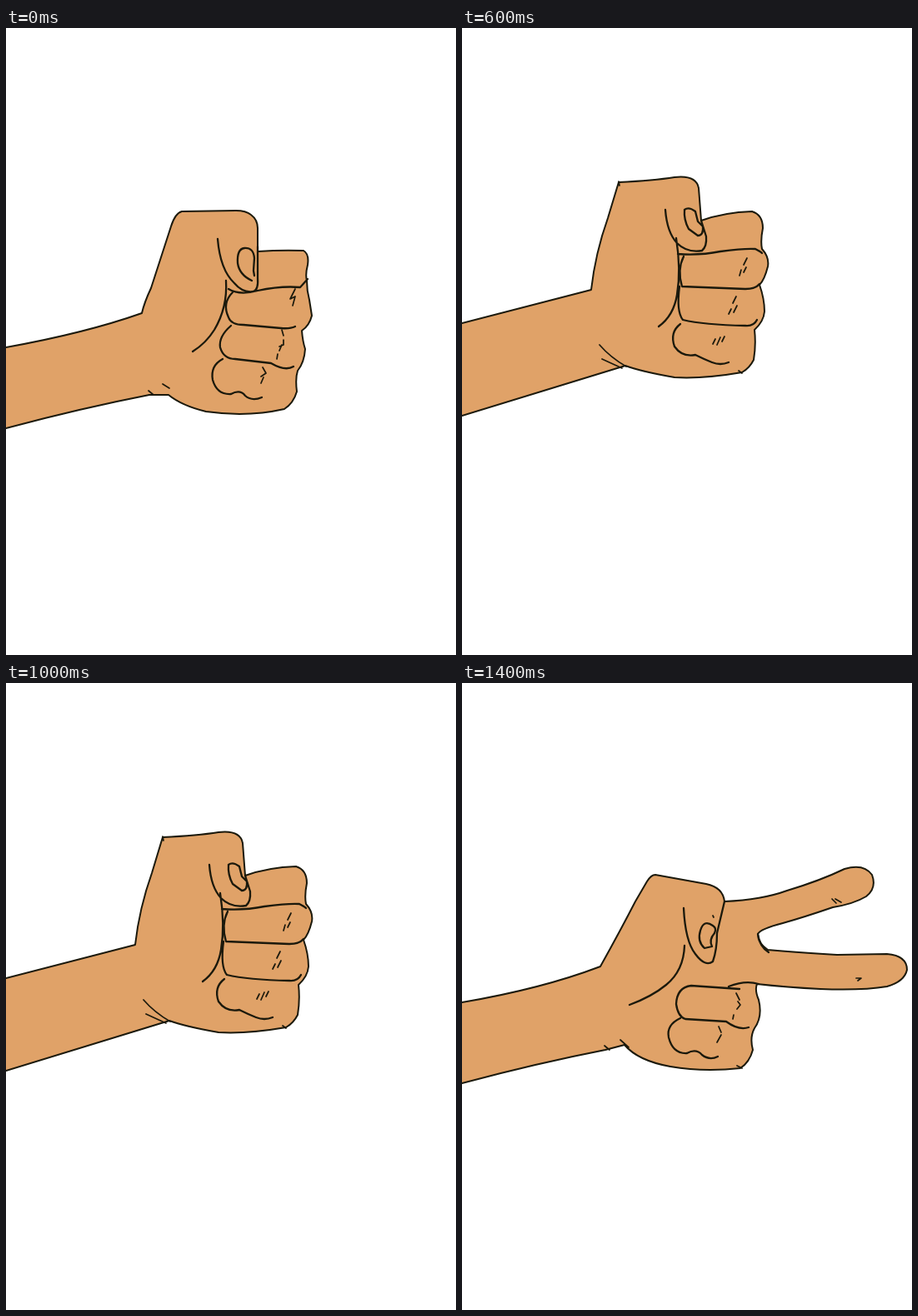
These frames come from a looping animation (540 by 752 pixels, 3.4 s). An HTML page with a canvas:

```html
<!DOCTYPE html>
<html lang="en">
<head>
<meta charset="utf-8">
<title>Rock paper scissors</title>
<style>
  html, body { margin: 0; width: 100%; height: 100%; overflow: hidden; background: #fff; }
  canvas { display: block; width: 540px; height: 752px; }
</style>
</head>
<body>
<canvas id="stage" width="540" height="752"></canvas>
<script>
const ctx = document.getElementById('stage').getContext('2d');
const SKIN = '#e0a268', INK = '#1b190c';
const STEP = 100, LOOP = 3400;

const pose = (outline, creases = '', marks = '', tilt = 0) => ({
  outline: new Path2D(outline),
  creases: new Path2D(creases),
  marks: new Path2D(marks),
  tilt
});

const low = pose(
  `M-40 391 L0 383 Q95 366 163 342 Q166 329 174 312 L198 238 Q203 222 211 220
   L276 219 Q288 219 294 224 Q302 230 302 240 L302 268 Q330 266 357 267
   Q364 271 362 284 Q359 296 361 303 Q361 315 364 326 L367 345 Q364 357 355 363
   Q356 376 359 385 Q358 401 350 411 Q347 420 349 436 Q345 450 334 457
   Q290 467 240 460 Q211 453 195 440 L172 440 Q90 456 0 480 L-40 490 Z`,
  `M254 253 Q257 290 274 306 Q284 318 297 316 Q303 314 302 300 L302 262
   M295 303 Q280 296 278 282 Q277 265 286 264 Q297 263 298 276 L297 291 L298 297
   M264 303 Q266 335 250 362 Q240 378 224 388
   M267 313 Q280 321 302 315 Q330 309 353 311 L362 301
   M272 317 Q259 330 267 347 Q270 356 285 356 L330 360 Q341 361 347 358
   M270 357 Q255 370 257 383 Q261 397 275 397 L318 402 Q335 412 345 406
   M260 397 Q245 405 248 422 Q253 440 270 439 Q281 433 287 441 Q295 448 307 443`,
  `M171 435 L177 440 M188 427 L196 432 M347 313 L341 325 L347 322 L344 333
   M331 362 L333 369 M333 374 L333 380 L328 382 M331 380 L328 387 M326 391 L325 397
   M308 407 L312 414 L306 418 M309 419 L306 426`);

const mid = pose(
  `M-40 365 L0 354 L155 314 Q160 270 175 228 L188 185 Q230 183 255 179
   Q281 176 284 192 L287 231 Q315 221 348 220 Q361 224 361 240 Q358 255 360 265
   Q369 275 367 286 Q363 302 357 308 Q363 325 363 340 Q362 352 351 362
   Q353 380 350 398 Q345 408 336 413 Q290 421 255 419 Q215 412 196 405
   L0 465 L-40 477 Z`,
  `M244 218 Q246 245 258 258 Q270 270 288 267 Q294 262 293 250 L287 231
   M267 218 Q272 214 280 220 L283 232 L289 238 Q290 249 283 249 L272 241 Q266 230 267 218
   M257 252 Q263 290 258 320 Q254 345 236 358
   M259 271 Q285 273 310 268 Q340 264 352 265 Q358 268 360 270
   M266 274 Q258 290 264 310 L340 313 Q352 313 357 307
   M261 310 Q257 340 265 350 Q290 356 340 357 Q350 358 354 350
   M262 355 Q249 365 255 382 Q264 395 280 392 Q290 397 300 401 Q310 405 320 401`,
  `M165 380 Q178 395 197 406 M168 397 L192 408 M188 184 L189 189 M332 411 L336 414
   M342 276 L338 284 M341 287 L338 293 M335 290 L333 297
   M329 322 L325 330 M330 333 L326 341 M323 337 L320 343
   M304 373 L301 379 M310 371 L306 380 M315 370 L312 376`);

const highShape = [
  `M-40 331 L0 310 L144 235 Q141 195 148 125 Q152 106 168 104 Q200 102 225 94
   Q238 90 241 95 L263 134 Q290 121 314 111 Q322 112 326 124 L338 150
   Q342 163 337 172 Q339 185 344 205 Q343 218 335 227 Q341 243 341 255
   Q338 270 331 274 L335 303 Q328 316 318 321 Q290 328 250 329 Q210 328 183 325
   L0 414 L-40 433 Z`,
  `M262 132 Q273 150 273 165 Q268 175 252 174 Q238 172 226 163 Q217 158 214 149
   M190 140 Q200 157 217 160 L228 162
   M263 151 Q245 154 237 142 Q230 130 239 125 Q249 122 255 132 Q261 145 257 149
   M238 170 L243 178 Q285 170 317 159 M325 160 Q331 170 335 181 L339 190
   M241 178 Q246 215 232 254
   M244 180 Q238 200 250 209 L272 211 Q300 212 323 207 L334 228
   M246 211 Q239 235 244 246 Q252 253 270 251 L320 250 L332 277
   M250 254 Q237 264 240 282 Q247 292 262 290 Q275 286 284 292 L312 295
   M277 288 L293 304`,
  `M160 301 L170 312 M165 295 L175 307 M167 321 L187 326
   M315 126 L317 133 M319 123 L320 130 M312 173 L307 183 L313 182 L309 189
   M307 185 L303 197
   M300 224 L295 236 L302 234 L299 243 M288 258 L279 270 L288 267 L279 283`
];
const high = pose(...highShape);
const peak = pose(...highShape, -0.044);

const swing = pose(
  `M-40 338 L0 322 Q70 293 130 259 Q146 249 149 260 L157 276 Q156 240 153 205
   Q145 165 146 140 Q148 119 160 116 Q180 107 200 103 Q212 99 219 108
   Q240 135 266 171 Q264 155 255 137 Q275 120 303 112 Q308 114 308 122
   L311 130 L308 128 Q325 200 331 250 Q336 300 337 350 L339 410 L334 445
   Q331 462 323 462 Q280 458 230 444 L183 429 L0 470 L-40 479 Z`);

const scissors = pose(
  `M-40 391 L0 383 Q95 367 166 340 Q190 297 208 262 L222 238 Q227 230 232 230
   L293 241 Q313 245 315 262 Q360 260 390 249 Q430 237 459 223 Q482 216 492 230
   Q498 246 485 256 Q470 265 445 269 Q410 281 385 288 Q358 295 355 301
   Q355 312 367 320 Q400 323 450 326 L510 325 Q534 327 534 344 Q531 358 510 364
   Q480 369 430 367 Q390 365 354 361 Q351 368 356 380 Q361 400 351 414
   Q345 425 349 440 Q345 455 334 462 Q290 467 250 460 Q211 453 195 434
   L172 440 Q90 456 0 480 L-40 490 Z`,
  `M266 270 Q268 310 280 325 Q292 341 301 334 Q306 320 306 300 L315 262
   M301 291 Q290 283 286 297 Q282 310 291 318 L300 316 Q296 308 303 300 Q306 294 301 291
   M267 315 Q266 345 245 362 Q228 376 201 386
   M320 364 Q340 356 356 361 M355 301 Q357 316 368 323
   M333 367 L275 363 Q258 365 257 385 Q259 400 268 403 L317 406 Q332 417 344 413
   M262 402 Q245 410 248 425 Q253 445 270 444 Q281 438 288 446 Q297 453 307 448`,
  `M171 435 L177 440 M190 428 L200 437 M301 279 L302 281
   M444 259 L449 264 M448 259 L455 263 M473 354 L479 354 L475 357
   M329 372 L333 380 M331 382 L334 386 L330 391 M326 398 L325 403
   M308 412 L311 419 M311 422 L306 431 M330 459 L336 462`);

// Three pumps of the fist, then the throw.
const sequence = [
  low, mid, high, peak, swing,
  low, mid, high, swing,
  low, mid, high, peak, swing,
  scissors
];

function ink(path, width) {
  ctx.lineWidth = width;
  ctx.stroke(path);
}

function draw({ outline, creases, marks, tilt }) {
  ctx.fillStyle = '#fff';
  ctx.fillRect(0, 0, 540, 752);
  ctx.save();
  ctx.translate(0, 360);
  ctx.rotate(tilt);
  ctx.translate(0, -360);
  ctx.fillStyle = SKIN;
  ctx.strokeStyle = INK;
  ctx.lineCap = ctx.lineJoin = 'round';
  ctx.fill(outline);
  ink(outline, 2);
  ink(creases, 2.3);
  ink(marks, 1.7);
  ctx.restore();
}

const start = performance.now();
function tick() {
  const t = (performance.now() - start) % LOOP;
  draw(sequence[Math.min(Math.floor(t / STEP), sequence.length - 1)]);
  requestAnimationFrame(tick);
}
tick();
</script>
</body>
</html>
```
